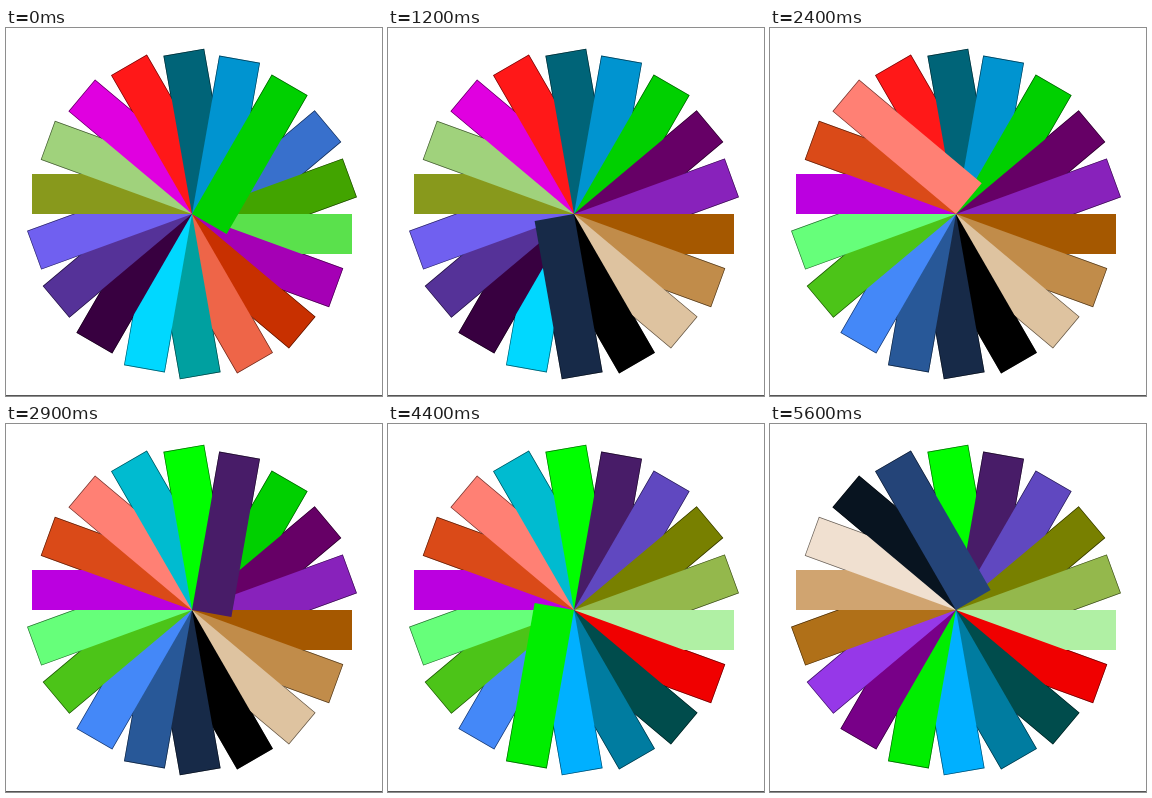
Animation, 376 px wide and 368 px high, one loop 5700 ms. Source, as an HTML page with a canvas:

```html
<!DOCTYPE html>
<html lang="en">
<head>
<meta charset="utf-8">
<title>Colour fan</title>
<style>
  html, body { margin: 0; width: 100%; height: 100%; overflow: hidden; background: #fff; }
  canvas { display: block; }
</style>
</head>
<body>
<canvas id="stage" width="376" height="368"></canvas>
<script>
const ctx = document.getElementById('stage').getContext('2d');

const LOOP = 5700;       // ms
const TICK = 100;        // ms per picture
const BARS = 18;         // bars in a full turn
const STEP = 360 / BARS; // degrees between bars
const FIRST = 320;       // angle of the first bar
const CENTRE = 186, LENGTH = 160, WIDTH = 40;

// One colour per bar, in drawing order; each line is half a turn.
const colours = `
  3870cc 42a400 5ae14c a500b5 c83000 ee6548 00a0a0 00d8ff 380040
  553298 7060f0 88991c a0d27c e000e0 ff1818 006478 0094d0 00d000
  660066 8822bb a55800 c18c4a dec3a0 000000 172a48 285898 4488f8
  4cc418 66ff7a bb00e0 da4a18 ff8074 00bbd0 00ff00 481c68 6048c0
  788000 94b84c b0f0a4 f00000 004c4c 007ca0 00b0ff 00ee00 780088
  9638e8 b07018 d0a470 f0e0d0 081420 244478
`.trim().split(/\s+/).map(hex => '#' + hex);

function place(i) {
  ctx.setTransform(1, 0, 0, 1, CENTRE, CENTRE);
  ctx.rotate((FIRST + i * STEP) * Math.PI / 180);
}

// Darkened rim behind the slanted bars.
function rim(i) {
  if ((FIRST + i * STEP) % 180 === 0) return;
  place(i);
  for (const colour of [colours[i], 'rgba(0, 0, 0, .55)']) {
    ctx.strokeStyle = colour;
    ctx.strokeRect(0, 0, LENGTH, WIDTH);
  }
}

function bar(i) {
  place(i);
  ctx.fillStyle = colours[i];
  ctx.fillRect(0, 0, LENGTH, WIDTH);
}

function draw(time) {
  // Three new bars every five pictures.
  const first = Math.floor(Math.floor(time / TICK) * 3 / 5);
  const last = first + BARS;

  ctx.setTransform(1, 0, 0, 1, 0, 0);
  ctx.fillStyle = '#fff';
  ctx.fillRect(0, 0, 376, 368);
  ctx.fillStyle = '#555';
  ctx.fillRect(0, 367, 376, 1);

  ctx.lineWidth = 1.4;
  for (let i = first; i < last; i++) rim(i);
  for (let i = first; i < last; i++) bar(i);
}

function frame() {
  draw(performance.now() % LOOP);
  requestAnimationFrame(frame);
}
frame();
</script>
</body>
</html>
```
